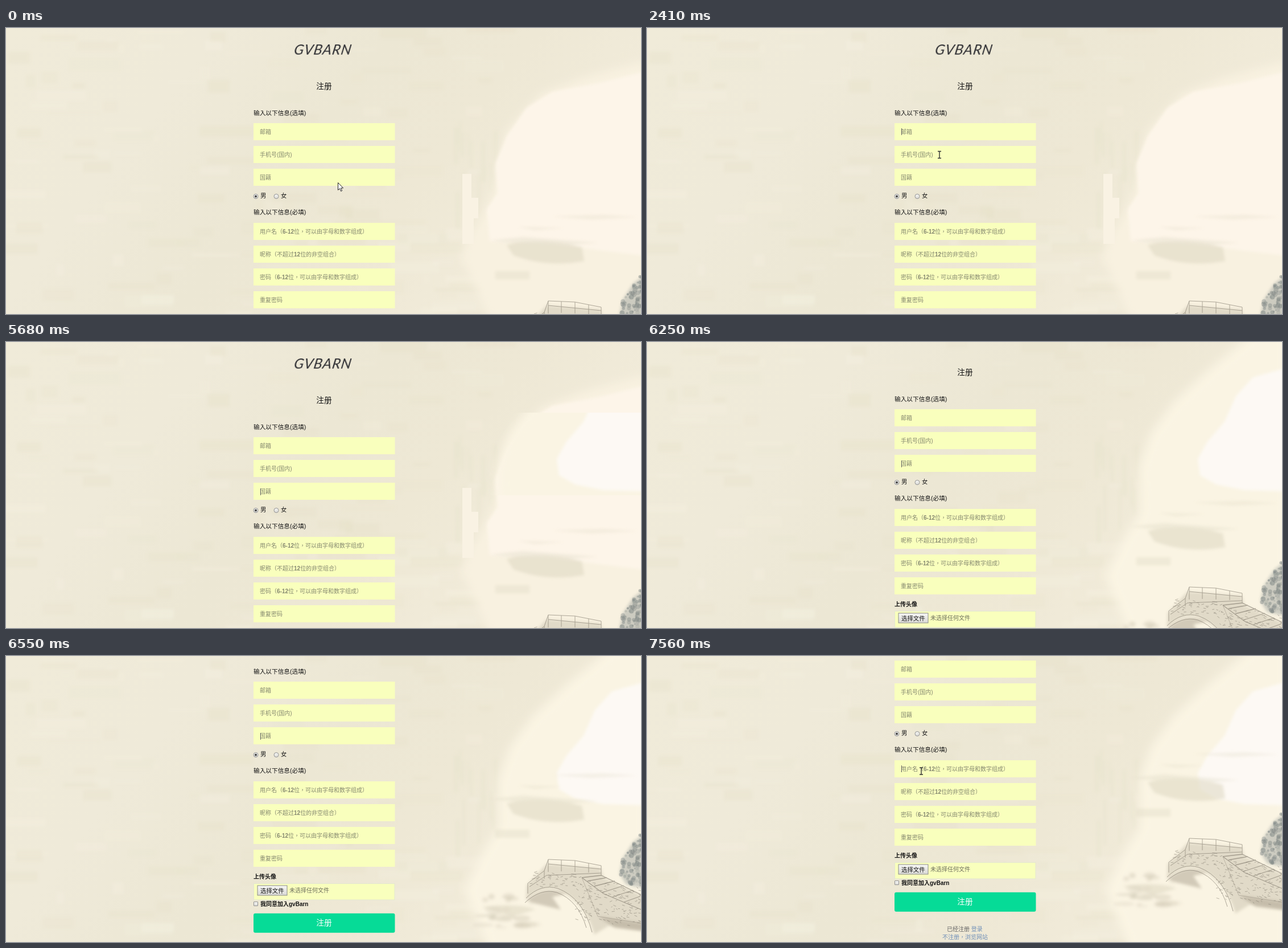
Write an HTML page that moves like this. It is 1116 px wide and 502 px high and loops after 8000 ms.

```html
<!DOCTYPE html>
<html>
<head>
<meta charset="utf-8">
<style>
html, body { margin: 0; width: 100%; height: 100%; overflow: hidden; background: #efead9; }
svg { display: block; width: 1116px; height: 502px; }
text { font-family: "Liberation Sans", "Noto Sans CJK TC", "Noto Sans CJK SC", sans-serif; white-space: pre; }
#logo { font: italic 400 25px Lato, sans-serif; letter-spacing: 1px; }
</style>
</head>
<body>
<svg viewBox="0 0 1116 502">
  <defs>
    <linearGradient id="paper" x2="1" y2=".35">
      <stop offset="0" stop-color="#f0ebd9"/>
      <stop offset=".3" stop-color="#efead9"/>
      <stop offset=".55" stop-color="#ece7d4"/>
      <stop offset=".75" stop-color="#eee8d5"/>
      <stop offset="1" stop-color="#f2ecdb"/>
    </linearGradient>
    <linearGradient id="grey" x2="0" y2="1">
      <stop offset="0" stop-color="#f7f7f5"/>
      <stop offset="1" stop-color="#d9d9d6"/>
    </linearGradient>
    <filter id="soft"><feGaussianBlur stdDeviation="2.5"/></filter>
    <filter id="fine"><feGaussianBlur stdDeviation=".6"/></filter>
    <filter id="haze" x="-30%" y="-30%" width="160%" height="160%"><feGaussianBlur stdDeviation="9"/></filter>
    <clipPath id="band"><rect x="690" y="124" width="426" height="145"/></clipPath>
  </defs>

  <rect width="1116" height="502" fill="url(#paper)"/>
  <g id="stains" filter="url(#soft)"></g>

  <g id="earlyMist">
    <path filter="url(#haze)" fill="#f8f1e0" d="M1116 60L1020 85 940 115 880 180 850 300 800 400 850 510H1130V60Z"/>
    <path filter="url(#soft)" fill="#fdf5e9" d="M1125 76L1040 97 960 112 915 140 880 190 860 238 864 290 845 318 850 375 960 380 1125 400Z"/>
    <path fill="#f9f2e3" d="M802 256h16v42h12v36h-8v45h-20z"/>
  </g>
  <g id="lateMist">
    <path filter="url(#haze)" fill="#faf4e3" d="M1130-20H1070L985 50 925 105 885 160 864 220 866 300 840 340 805 410 850 520H1130Z"/>
    <path filter="url(#soft)" fill="#fdf9f4" d="M1125 45L1065 62 1035 95 1015 140 985 175 968 205 972 234 1000 250 1050 260 1125 262Z"/>
  </g>

  <g id="page">
    <g id="scene" transform="translate(0 159)">
      <g filter="url(#soft)" fill="#ddd7c1" opacity=".55">
        <path d="M880 222Q940 206 1012 226L1016 250Q950 262 892 240Z"/>
        <path d="M860 268h60v14h-60zM850 214l60-6 130 10-90 6z" opacity=".6"/>
        <path d="M836 404Q900 396 930 408L890 420Z"/>
        <path d="M960 172l90-3 60 4-80 4zM900 190l80 2-50 4z" opacity=".5"/>
      </g>
      <path filter="url(#soft)" fill="#b9bbb3" opacity=".7" d="M1125 272L1102 290 1084 318 1078 345 1090 364 1125 372Z"/>
      <path filter="url(#soft)" fill="#e1dac8" d="M915 366L950 328 1045 335 1050 352 1122 385V446L1060 436 1034 452Q1018 394 968 372 938 366 914 392Z"/>
      <path filter="url(#soft)" fill="#aaa08e" opacity=".5" d="M916 392Q945 364 985 380L960 386 975 408 925 396ZM1040 420L1122 432V446L1070 440Z"/>
      <g id="bank" filter="url(#soft)" fill="#d3ccb8"></g>
      <g id="stones" filter="url(#fine)" stroke="#7d776b" fill="none" opacity=".5"></g>
      <g fill="none" stroke="#857e71" opacity=".65" filter="url(#fine)">
        <path d="M917 362L946 340 953 320 1000 322 1046 331M920 368L950 348 1046 344M953 328L1046 337M917 362v18M946 340v14M953 320v22M976 321v20M1000 322v20M1024 327v16M1046 331v18"/>
        <path d="M914 388Q940 362 970 371 1015 388 1030 448M912 396Q940 370 968 378 1006 392 1020 440"/>
        <path d="M1012 352L1046 348 1116 382M1012 352L1050 380 1116 408M1022 358l34-6M1034 367l36-9M1048 378l38-12M1066 386l36-12M1086 395l28-10" stroke-width="1.3"/>
        <path d="M1012 352L1040 420 1116 432" opacity=".6"/>
      </g>
      <g id="leaves" fill="#7b8381" filter="url(#fine)"></g>
    </g>
    <g id="form"></g>
    <rect id="caret" x="447" width="1" height="12" fill="#666"/>
  </g>

  <path id="arrow" fill="#fff" stroke="#222" d="M.5.5V13.5L3.5 10.7 5.6 15.5 7.6 14.6 5.6 9.9H9.6Z"/>
  <path id="beam" fill="none" stroke="#333" stroke-width="1.4" d="M-3-6H3M-3 6H3M0-6V6"/>
</svg>
<script>
const $ = id => document.getElementById(id);

let seed = 7;
const rand = (a, b) => {
  seed = (seed * 16807) % 2147483647;
  return a + (b - a) * seed / 2147483647;
};
const repeat = (n, make) => Array.from({length: n}, make).join('');

$('stains').innerHTML = repeat(130, () => {
  const tone = rand(0, 1) < .5 ? '#f5f0e1' : '#e7e1c9';
  return `<rect x="${rand(-30, 880)}" y="${rand(-10, 500)}" width="${rand(12, 95)}" height="${rand(4, 22)}" fill="${tone}" opacity="${rand(.1, .4)}"/>`;
}) + repeat(14, () =>
  `<rect x="${rand(780, 860)}" y="${rand(160, 300)}" width="${rand(3, 9)}" height="${rand(25, 80)}" fill="#e6e3cd" opacity=".4"/>`);

$('bank').innerHTML = repeat(24, () =>
  `<ellipse cx="${rand(835, 925)}" cy="${rand(385, 445)}" rx="${rand(5, 20)}" ry="${rand(2, 6)}" opacity="${rand(.15, .5)}"/>`);

$('stones').innerHTML = repeat(150, () => {
  const x = rand(1000, 1114), y = rand(360, 432) + (x - 1050) * .1;
  return `<path d="M${x} ${y}l${rand(2, 6)} ${rand(-2, 3)}"/>`;
}) + repeat(50, () => `<path d="M${rand(918, 1010)} ${rand(342, 368)}l${rand(2, 6)} ${rand(-2, 2)}"/>`);

$('leaves').innerHTML = repeat(80, () => {
  const x = 1118 - 38 * rand(0, 1) ** 1.3;
  const y = rand(272 + (1116 - x) * 1.4, 370 - (1116 - x) * .3);
  return `<circle cx="${x}" cy="${y}" r="${rand(1.5, 4.5)}" opacity="${rand(.15, .5)}"/>`;
});

const HINT = '#85876f', INK = '#151515';
const bold = 'font-weight="bold"', middle = 'text-anchor="middle"';
const text = (x, y, str, size = 10, fill = INK, more = '') =>
  `<text x="${x}" y="${y + size * .37}" font-size="${size}" fill="${fill}" ${more}>${str}</text>`;
const field = (y, hint) =>
  `<rect x="435" y="${y}" width="248.5" height="30" fill="#f9ffbd"/>` +
  text(446, y + 15, hint.replace(/[\d-]+/, `<tspan ${bold}>$&</tspan>`), 10, HINT);
const radio = (x, label, on) =>
  `<circle cx="${x}" cy="295.5" r="4" fill="url(#grey)" stroke="#929292"/>` +
  (on ? `<circle cx="${x}" cy="295.5" r="2" fill="#444"/>` : '') +
  text(x + 8, 294.5, label, 10.4, INK, 'font-weight="500"');

$('form').innerHTML = [
  '<text id="logo" transform="translate(505 47) skewX(-10)" fill="#2c2c30">GVBARN</text>',
  text(559, 102, '注册', 13.7, INK, middle),
  text(435, 149, '输入以下信息(选填)', 10.67),
  field(167, '邮箱'),
  field(207, '手机号(国内)'),
  field(247, '国籍'),
  radio(439, '男', true),
  radio(475, '女'),
  text(435, 323, '输入以下信息(必填)', 10.67),
  field(342, '用户名（6-12位，可以由字母和数字组成）'),
  field(382, '昵称（不超过12位的非空组合）'),
  field(422, '密码（6-12位，可以由字母和数字组成）'),
  field(462, '重复密码'),
  text(435, 509, '上传头像', 10, INK, bold),
  '<rect x="435.5" y="521.5" width="247.5" height="28.5" fill="#f9ffbd" stroke="#e3e7d0"/>',
  '<rect x="442" y="525" width="52" height="17" fill="url(#grey)" stroke="#8b8b88"/>',
  text(447, 534, '选择文件', 10.4),
  text(498, 533.5, '未选择任何文件', 10, '#6d6e5c'),
  '<rect x="435.5" y="553.5" width="7" height="7" rx=".5" fill="url(#grey)" stroke="#929292"/>',
  text(447, 557, '我同意加入gvBarn', 10, INK, bold),
  '<rect x="435" y="573.7" width="248.5" height="34" rx="3" fill="#06db97"/>',
  text(559, 590, '注册', 13.7, '#fff', middle),
  text(527, 638, '已经注册 <tspan fill="#6f8fb8">登录</tspan>', 10, '#666'),
  text(519, 652, '不注册，浏览网站', 10, '#6f8fb8')
].join('');

// Each entry holds from its time (first value) until the next one.
const scrolls = [[0, 0], [6250, 49], [6400, 88], [6550, 122], [6700, 150], [6850, 159]];
const EMAIL = 176, NATION = 257, USER = 351;
const carets = [[0], [1460, EMAIL], [1980], [2410, EMAIL], [2980, NATION], [3290], [3570, NATION],
  [4070], [4500, NATION], [5040], [5560, NATION], [6980], [7560, USER]];
const pointers = [
  [0, 'arrow', 583, 271], [120, 'beam', 582, 262], [270, 'arrow', 574, 241], [410, 'beam', 560, 222],
  [560, 'arrow', 543, 199], [700, 'beam', 532, 188], [850, 'beam', 526, 180],
  [1740, 'beam', 527, 181], [1860, 'arrow', 520, 199], [1980, 'beam', 514, 222.5],
  [2560, 'beam', 512, 227], [2710, 'arrow', 505, 240], [2840, 'beam', 500, 262],
  [3290, 'beam', 640, 252], [3430, 'arrow', 1106, 124], [3570],
  [4500, 'arrow', 1017, 161], [4650, 'arrow', 1012, 190], [4780, 'arrow', 1004, 235],
  [4900, 'arrow', 994, 285], [5040, 'arrow', 985, 318], [5160, 'arrow', 981, 331], [5680],
  [6980, 'arrow', 860, 300], [7130, 'arrow', 720, 240], [7290, 'beam', 605, 203],
  [7410, 'beam', 500, 203], [7560, 'beam', 482, 202]
];
const at = (list, t) => list.findLast(step => step[0] <= t);
const show = (el, on) => el.setAttribute('visibility', on ? 'visible' : 'hidden');

function draw(now) {
  const t = now % 8000;
  $('page').setAttribute('transform', `translate(0 ${-at(scrolls, t)[1]})`);

  const caretY = at(carets, t)[1];
  show($('caret'), caretY);
  if (caretY) $('caret').setAttribute('y', caretY);

  const [, shape, x, y] = at(pointers, t);
  for (const id of ['arrow', 'beam']) {
    show($(id), shape === id);
    if (shape === id) $(id).setAttribute('transform', `translate(${x} ${y})`);
  }

  const late = t >= 6250;
  show($('earlyMist'), !late);
  show($('lateMist'), t >= 3430);
  $('lateMist').setAttribute('clip-path', late ? 'none' : 'url(#band)');
}

const start = performance.now();
function tick() {
  draw(performance.now() - start);
  requestAnimationFrame(tick);
}
tick();
</script>
</body>
</html>
```
